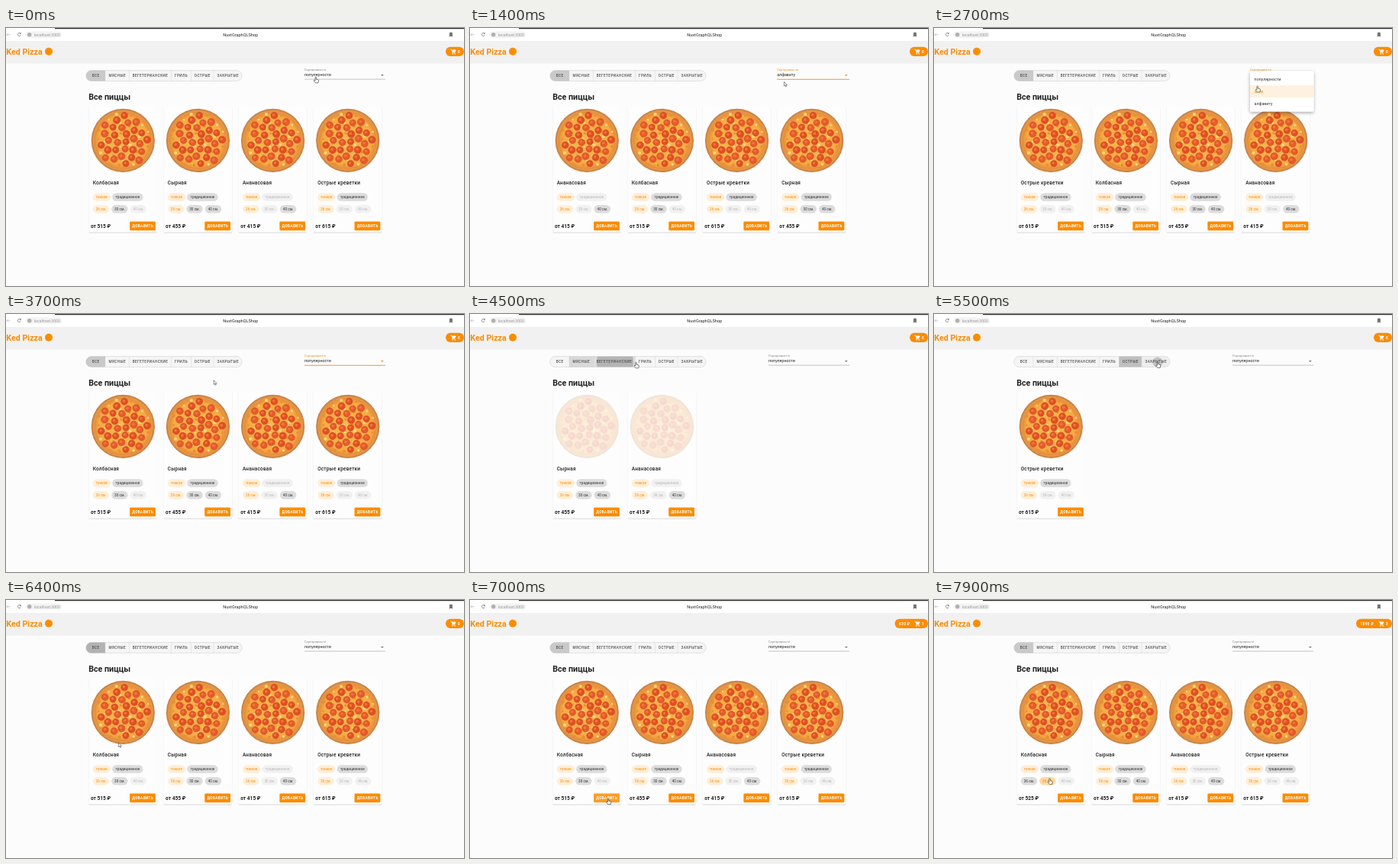
Recreate the animation shown at these times as an HTML page. Size 600 by 338 pixels, loop 8000 ms.

```html
<!DOCTYPE html>
<html lang="ru">
<head>
<meta charset="utf-8">
<title>NuxtGraphQLShop</title>
<style>
html, body { margin: 0; width: 100%; height: 100%; overflow: hidden; background: #fcfcfd; }
svg { display: block; width: 100%; height: 100%; font-family: Roboto, sans-serif; }
text { fill: #222; white-space: pre; }
.mid { text-anchor: middle; }
.caps { font-size: 4.65px; font-weight: 500; letter-spacing: .42px; }
</style>
</head>
<body>
<svg id="stage" viewBox="0 0 600 338">
  <defs>
    <radialGradient id="crust">
      <stop offset=".84" stop-color="#eeb062"/><stop offset=".94" stop-color="#dd9248"/><stop offset="1" stop-color="#c2763a"/>
    </radialGradient>
    <radialGradient id="cheese">
      <stop offset="0" stop-color="#f9b750"/><stop offset=".85" stop-color="#f6ab45"/><stop offset="1" stop-color="#e48a35"/>
    </radialGradient>
    <filter id="soft" x="-10%" y="-10%" width="120%" height="125%">
      <feDropShadow dx="0" dy=".7" stdDeviation=".7" flood-opacity=".25"/>
    </filter>
    <filter id="deep" x="-15%" y="-15%" width="130%" height="140%">
      <feDropShadow dx="0" dy="1.6" stdDeviation="1.9" flood-opacity=".35"/>
    </filter>
    <clipPath id="pill"><rect x="104.7" y="55.6" width="204.4" height="13.9" rx="6.95"/></clipPath>
    <g id="pizza"></g>
  </defs>
</svg>
<script>
const LOOP = 8000, ORANGE = '#fb8c00';
const svg = document.getElementById('stage');

function el(parent, tag, attrs = {}, text) {
  const node = document.createElementNS('http://www.w3.org/2000/svg', tag);
  set(node, attrs);
  if (text !== undefined) node.textContent = text;
  return parent.appendChild(node);
}
function set(node, attrs) {
  for (const k in attrs) node.setAttribute(k, attrs[k]);
}
const group = (parent, attrs) => el(parent, 'g', attrs);
const rect = (parent, x, y, width, height, fill, rx = 0) =>
  el(parent, 'rect', { x, y, width, height, fill, rx });
const label = (parent, x, y, size, str, attrs = {}) =>
  el(parent, 'text', { x, y, 'font-size': size, ...attrs }, str);
const show = (node, on) => set(node, { display: on ? 'inline' : 'none' });
const clamp = v => Math.max(0, Math.min(1, v));
const ease = v => v * v * (3 - 2 * v);
const at = (steps, t) => steps.filter(s => s[0] <= t).pop();

// Pizza: crust, cheese and slices in a sunflower layout
const pizza = document.getElementById('pizza');
el(pizza, 'circle', { r: 41.6, fill: 'url(#crust)' });
el(pizza, 'circle', { r: 37.6, fill: 'url(#cheese)' });
function scatter(count, step, turn, draw) {
  for (let i = 0; i < count; i++) {
    const r = step * Math.sqrt(i + .45), a = i * 2.39996 + turn;
    draw(r * Math.cos(a), r * Math.sin(a), i);
  }
}
scatter(60, 4.6, 1.1, (cx, cy, i) =>
  el(pizza, 'circle', { cx, cy, r: 1.3 + i % 3 * .4, fill: i % 2 ? '#fcd57e' : '#e98f35' }));
scatter(30, 6.15, .4, (cx, cy, i) => {
  const r = 4.2 + i % 3 * .25;
  el(pizza, 'circle', { cx, cy, r, fill: i % 2 ? '#e8592a' : '#e24e22', stroke: '#c2461f', 'stroke-width': .5 });
  el(pizza, 'circle', { cx: cx - .8, cy: cy - .8, r: r * .4, fill: '#f0763f' });
});

// Browser bar
rect(svg, 0, 0, 600, 17, '#fff');
rect(svg, 64, 0, 536, 1.2, '#2e2e2e');
const line = { fill: 'none', stroke: '#555', 'stroke-width': .6 };
el(svg, 'path', { d: 'M5.5 8.7H1M3 6.7L1 8.7L3 10.7', ...line, stroke: '#aaa' });
el(svg, 'path', { d: 'M19.2 7.4A2.1 2.1 0 1 0 19.4 9.3M19.4 6V7.7H17.7', ...line });
rect(svg, 26, 4.6, 47, 8.2, '#f3f3f3', 4.1);
el(svg, 'circle', { cx: 30.7, cy: 8.7, r: 2.7, fill: '#b0b0b0' });
label(svg, 36.8, 10.5, 5.2, 'localhost:3000', { style: 'fill:#999' });
label(svg, 307.2, 10.6, 5.55, 'NuxtGraphQLShop', { class: 'mid' });
el(svg, 'path', { d: 'M581.4 6.2H584.4V11.2L582.9 10L581.4 11.2Z', ...line, fill: '#777', stroke: '#444' });

// Header
rect(svg, 0, 17, 600, 29.5, '#f1f1f1');
label(svg, .3, 34.6, 10.7, 'Ked Pizza', { 'font-weight': 700, style: 'fill:' + ORANGE });
el(svg, 'circle', { cx: 56, cy: 30.7, r: 5, fill: ORANGE });
const cartPill = rect(svg, 576, 24.8, 24, 12.2, ORANGE, 6.1);
const white = { 'font-weight': 700, style: 'fill:#fff' };
const total = label(svg, 558.5, 32.7, 4.7, '', { ...white, 'letter-spacing': .4 });
el(svg, 'path', {
  d: 'M582 28H583.3L585 31.6H588L589.2 29H583.9M585 31.6L584.4 32.8H588.8',
  fill: 'none', stroke: '#fff', 'stroke-width': .7
});
el(svg, 'path', { d: 'M583.8 28.8H589.2L588 31.6H585Z', fill: '#fff' });
for (const cx of [585, 588.1]) el(svg, 'circle', { cx, cy: 34, r: .65, fill: '#fff' });
const count = label(svg, 592, 32.7, 4.7, '0', white);

// Category tabs
const edges = [104.7, 130, 161.2, 216.4, 242.3, 272, 309.1];
const names = ['ВСЕ', 'МЯСНЫЕ', 'ВЕГЕТЕРИАНСКИЕ', 'ГРИЛЬ', 'ОСТРЫЕ', 'ЗАКРЫТЫЕ'];
const bar = group(svg, { 'clip-path': 'url(#pill)' });
rect(bar, 104, 55, 206, 15, '#f5f5f5');
const tabs = names.map((name, i) => {
  const x = edges[i], w = edges[i + 1] - x;
  const clip = el(svg.querySelector('defs'), 'clipPath', { id: 'tab' + i });
  rect(clip, x, 55, w, 15);
  const shade = rect(bar, x, 55, w, 15, '#000');
  const wave = el(bar, 'circle', { cy: 63, 'clip-path': `url(#tab${i})` });
  if (i) rect(bar, x - .2, 55, .4, 15, '#d2d2d2');
  label(bar, x + w / 2 + .2, 64.2, 4.65, name, { class: 'caps mid', style: 'fill:#505050' });
  return { shade, wave };
});
set(rect(svg, 104.7, 55.6, 204.4, 13.9, 'none', 6.95), { stroke: '#c8c8c8', 'stroke-width': .45 });

label(svg, 108.2, 94, 10.7, 'Все пиццы', { 'font-weight': 700 });

// Cards
const CHIP = {
  on: ['#ffeed8', ORANGE], focus: ['#ffd9a3', ORANGE],
  off: ['#dcdcdc', '#333'], none: ['#f1f1f1', '#b9b9b9']
};
function chip(parent, x, y, w, str, state) {
  const box = rect(parent, x, y, w, 10.6, '', 5.3);
  const text = label(parent, x + w / 2, y + 6.9, 4.69, str, { class: 'mid' });
  const paint = s => { set(box, { fill: CHIP[s][0] }); text.style.fill = CHIP[s][1]; };
  paint(state);
  return paint;
}
function makeCard(title, price, trad, mid, big) {
  const g = group(svg, {});
  set(rect(g, .2, 102, 89.8, 165.6, '#fdfdfd', 1.5), { filter: 'url(#soft)' });
  const photo = el(g, 'use', { href: '#pizza', x: 45.2, y: 147.4 });
  label(g, 5.6, 205.2, 6.45, title, { 'font-weight': 500, 'letter-spacing': .2 });
  chip(g, 5.5, 216.2, 23.3, 'тонкое', 'on');
  chip(g, 31.1, 216.2, 40.3, 'традиционное', trad);
  const sizes = [['26 см.', 'on'], ['30 см.', mid], ['40 см.', big]]
    .map(([str, s], i) => chip(g, 5.7 + i * 24.4, 232, 21.4, str, s));
  const cost = label(g, 2.8, 261.6, 6.6, `от ${price} ₽`, { 'font-weight': 700 });
  rect(g, 54, 253.5, 33.8, 11.8, ORANGE, 1.3);
  const flash = rect(g, 54, 253.5, 33.8, 11.8, '#fff', 1.3);
  label(g, 71.2, 261, 4.65, 'ДОБАВИТЬ', { class: 'caps mid', style: 'fill:#fff;font-weight:700' });
  return { g, photo, sizes, cost, flash };
}
const cards = [
  makeCard('Колбасная', 515, 'off', 'off', 'none'),
  makeCard('Сырная', 455, 'off', 'off', 'off'),
  makeCard('Ананасовая', 415, 'none', 'none', 'off'),
  makeCard('Острые креветки', 615, 'off', 'none', 'none')
];

// Sort field and its menu
const sorts = ['популярности', 'цене', 'алфавиту'];
const lefts = [391, 414, 402.2];
const hint = label(svg, 0, 55.8, 4, 'Сортировка по');
const value = label(svg, 0, 63.4, 5.3, '');
const under = rect(svg, 0, 66.8, 1, .5, '#888');
const arrow = el(svg, 'path', { d: 'M491 61H494.8L492.9 62.9Z' });
const menu = group(svg, {});
const sheet = rect(menu, 0, 56.6, 1, 52.8, '#fff', 1.5);
set(sheet, { filter: 'url(#deep)' });
const rows = sorts.map((name, i) => ({
  bg: rect(menu, 0, 59 + i * 16, 1, 16, '#fff'),
  text: label(menu, 0, 68.8 + i * 16, 5.3, name)
}));

// Pointers
const hand = el(svg, 'path', {
  d: 'M-.7 .6Q0 -.4 .7 .6V3.2L2.9 3.7Q4 4 3.8 5.1L3.2 7.9H-.2L-2.4 5.2Q-2.3 4.1 -1.2 4.6L-.7 5.1Z',
  fill: '#fff', stroke: '#222', 'stroke-width': .6
});
const pointer = el(svg, 'path', {
  d: 'M0 0V5.6L1.3 4.4L2.2 6.4L3.1 6L2.2 4.1H4Z', fill: '#fff', stroke: '#222', 'stroke-width': .5
});

// Story: [time, ...values]
const path = [
  [0, 405.7, 64], [250, 405.7, 64], [750, 424, 96], [950, 424, 96], [1300, 411.5, 70.5],
  [1420, 411.5, 70.5], [1500, 411.5, 65], [1800, 424, 79], [1980, 424, 79], [2120, 428, 63],
  [2320, 428, 63], [2600, 423.7, 76], [2720, 423.7, 76], [2950, 430, 64], [3100, 430, 64],
  [3300, 425, 72], [3550, 400, 110], [3850, 147, 64], [4080, 147, 64], [4320, 190, 63],
  [4370, 190, 63], [4500, 217.5, 63], [4620, 229, 63], [4800, 229, 63], [5000, 257, 63],
  [5150, 257, 63], [5420, 293, 62.5], [5560, 293, 62.5], [5950, 117, 63], [6080, 117, 63],
  [6370, 147.5, 187], [6450, 147.5, 187], [6720, 181, 260], [7260, 181, 260], [7400, 178, 270],
  [7640, 151.5, 233.5], [LOOP, 151.5, 233.5]
];
const sortAt = [[0, 0], [1000, 2], [2000, 1], [3080, 0]];
const orders = [[0, 1, 2, 3], [3, 0, 1, 2], [2, 0, 3, 1]];
const openings = [[200, 950], [1500, 1980], [2300, 3060]];
const tabAt = [[-900, 0], [3990, 1], [4350, 2], [4760, 3], [5080, 4], [5460, 5], [6050, 0]];
const kinds = [[0, 1, 2, 3], [0], [1, 2], [], [3], []];
const cartAt = [[0, 0, ''], [6850, 1, '630 ₽'], [7050, 2, '1260 ₽'], [7250, 3, '1890 ₽']];
const FETCH = 100;

function cursorAt(t) {
  const i = Math.max(1, path.findIndex(p => p[0] > t));
  const [t0, x0, y0] = path[i - 1], [t1, x1, y1] = path[i];
  const k = ease(clamp((t - t0) / (t1 - t0)));
  return [x0 + (x1 - x0) * k, y0 + (y1 - y0) * k];
}

function drawTabs(t) {
  const now = tabAt.indexOf(at(tabAt, t));
  tabs.forEach(({ shade, wave }, i) => {
    let dark = 0;
    set(wave, { r: 0 });
    tabAt.forEach(([start, tab], n) => {
      if (tab !== i || n > now) return;
      const age = t - start;
      const gone = n < now ? (t - tabAt[n + 1][0]) / 280 : 0;
      dark = Math.max(dark, .18 * clamp(age / 280) * (1 - clamp(gone)));
      if (age < 600) set(wave, {
        cx: cursorAt(start)[0], r: age * .16, 'fill-opacity': .18 * clamp((600 - age) / 400)
      });
    });
    set(shade, { 'fill-opacity': dark });
  });
}

function drawCards(t, sort) {
  const [start, tab] = at(tabAt, t - FETCH);
  const before = at(tabAt, start - 1);
  const old = before ? kinds[before[1]] : kinds[0];
  const list = orders[sort].filter(id => kinds[tab].includes(id));
  cards.forEach((card, id) => {
    const slot = list.indexOf(id);
    show(card.g, slot >= 0);
    set(card.g, { transform: `translate(${108.1 + slot * 98.15} 0)` });
    set(card.photo, { opacity: old.includes(id) ? 1 : clamp((t - FETCH - start) / 250) });
    set(card.flash, { 'fill-opacity': 0 });
  });
  const [clicked, n, sum] = at(cartAt, t);
  if (n) set(cards[0].flash, { 'fill-opacity': .3 * clamp(1 - (t - clicked) / 300) });
  const wide = t >= 7680;
  cards[0].sizes[0](wide ? 'off' : 'on');
  cards[0].sizes[1](wide ? 'focus' : 'off');
  cards[0].cost.textContent = `от ${wide ? 525 : 515} ₽`;
  const x = n ? (n > 1 ? 553 : 556.5) : 576;
  set(cartPill, { x, width: 600 - x });
  set(total, { x: x + 5.5 });
  total.textContent = sum;
  count.textContent = n;
}

function drawSort(t, sort, cy) {
  const left = lefts[sort], focus = t >= 200 && t < 3990;
  set(hint, { x: left });
  hint.style.fill = focus ? ORANGE : '#858585';
  set(value, { x: left });
  value.textContent = sorts[sort];
  set(under, { x: left, width: 497 - left, height: focus ? .9 : .5, fill: focus ? ORANGE : '#888' });
  set(arrow, { fill: focus ? ORANGE : '#777' });

  const span = openings.find(([a, b]) => t >= a && t < b + 150);
  show(menu, !!span);
  if (!span) return;
  const picked = at(sortAt, span[0])[1], x = lefts[picked], w = 497.3 - x;
  const grow = ease(clamp((t - span[0]) / 180));
  const alpha = Math.min(grow, 1 - clamp((t - span[1]) / 150));
  set(menu, { opacity: alpha, transform: `translate(0 ${56.6 * (1 - grow) * .4}) scale(1 ${.6 + .4 * grow})` });
  set(sheet, { x, width: w });
  rows.forEach(({ bg, text }, i) => {
    const over = cy > 58 + i * 16 && cy < 74 + i * 16;
    set(bg, { x, width: w, fill: i === picked ? '#fff1df' : over ? '#f4f4f4' : '#fff' });
    set(text, { x: x + 5.6 });
    text.style.fill = i === picked ? ORANGE : '#333';
  });
}

function drawCursor(t, x, y) {
  const inside = (a, b, c, d) => x > a && x < c && y > b && y < d;
  const link = inside(104, 55, 309, 69.5) || inside(391, 55, 497, 69) ||
    inside(114, 231, 185, 243) || inside(162, 253, 196, 266) ||
    openings.some(([a, b]) => t >= a && t < b);
  show(hand, link);
  show(pointer, !link);
  set(link ? hand : pointer, { transform: `translate(${x} ${y})` });
}

function render(t) {
  const sort = at(sortAt, t)[1], [x, y] = cursorAt(t);
  drawTabs(t);
  drawCards(t, sort);
  drawSort(t, sort, y);
  drawCursor(t, x, y);
}

const begin = performance.now();
function tick() {
  render((performance.now() - begin) % LOOP);
  requestAnimationFrame(tick);
}
tick();
</script>
</body>
</html>
```
